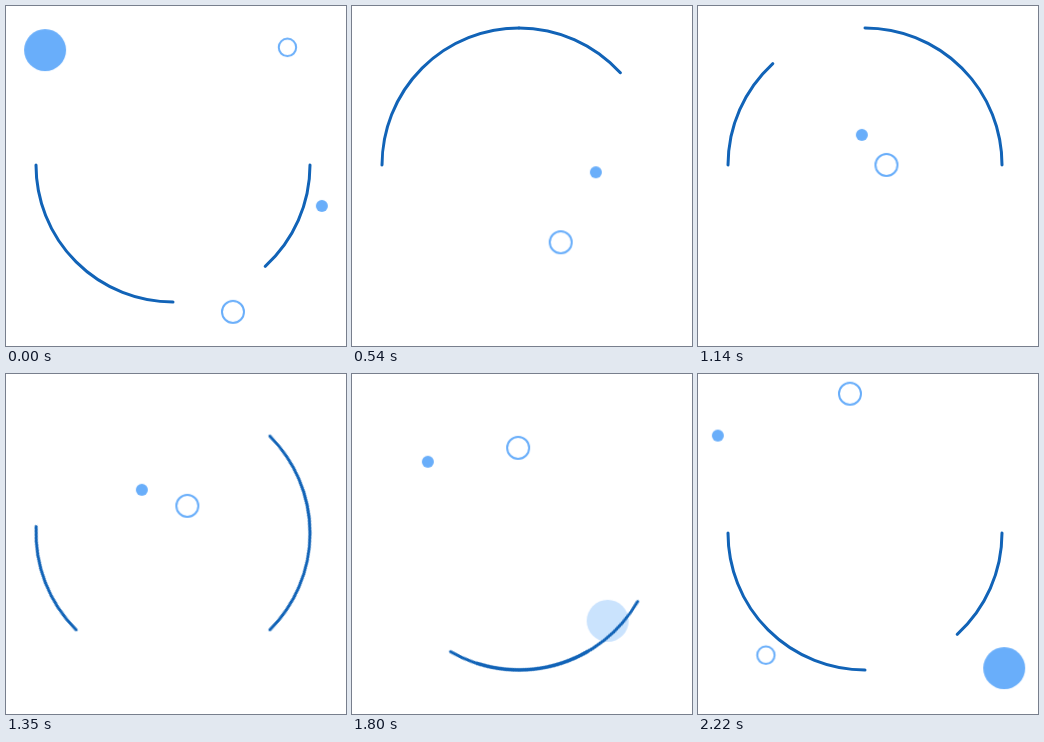
These frames come from a looping animation (340 by 340 pixels, 2250 ms). An HTML page:

```html
<!DOCTYPE html>
<html lang="en">
<head>
<meta charset="utf-8">
<title>Orbit loader</title>
<style>
  html, body { margin: 0; width: 100%; height: 100%; overflow: hidden; background: #fff; }
  svg { display: block; width: 100%; height: 100%; }
  .arc { fill: none; stroke: #1163b7; stroke-width: 3; stroke-linecap: round; }
  .dot { fill: #69aefa; }
  .ring { fill: none; stroke: #69aefa; stroke-width: 2; }
</style>
</head>
<body>
<svg viewBox="0 0 340 340">
  <circle id="bigDot" class="dot" cx="39" cy="44" r="21"/>
  <circle id="smallRing" class="ring" cx="281.5" cy="41.3" r="8.7"/>
  <circle id="bigRing" class="ring" cx="227" cy="306" r="11"/>
  <circle id="smallDot" class="dot" cx="316" cy="200" r="6"/>
  <g transform="translate(167 159)">
    <path id="longArc" class="arc" d="M0 137A137 137 0 0 1 -137 0"/>
    <path id="shortArc" class="arc" d="M137 0A137 137 0 0 1 92.2 101.3"/>
  </g>
</svg>
<script>
  const LOOP = 2250;
  const run = (id, frames, easing = 'linear') =>
    document.getElementById(id).animate(frames, { duration: LOOP, iterations: Infinity, easing });

  const drift = (id, dx, dy) =>
    run(id, { transform: ['translate(0px, 0px)', `translate(${dx}px, ${dy}px)`] });

  // Opaque at both ends of the loop, hidden between `gone` and `back` (ms).
  const fade = (id, gone, back, full) => run(id, [
    { opacity: 1, offset: 0 },
    { opacity: 0, offset: gone / LOOP },
    { opacity: 0, offset: back / LOOP },
    { opacity: 1, offset: full / LOOP },
    { opacity: 1, offset: 1 }
  ]);

  // 25 ticks of 15 degrees per loop.
  const tick = (id, dir) =>
    run(id, { transform: ['rotate(0deg)', `rotate(${dir * 375}deg)`] }, 'steps(25, end)');

  drift('bigDot', 270.7, 253.4);
  drift('smallRing', -216.4, 243);
  drift('bigRing', -76, -290);
  drift('smallDot', -300, -140.2);
  fade('bigDot', 450, 1590, 2190);
  fade('smallRing', 300, 1890, 2190);
  tick('longArc', 1);
  tick('shortArc', -1);
</script>
</body>
</html>
```
